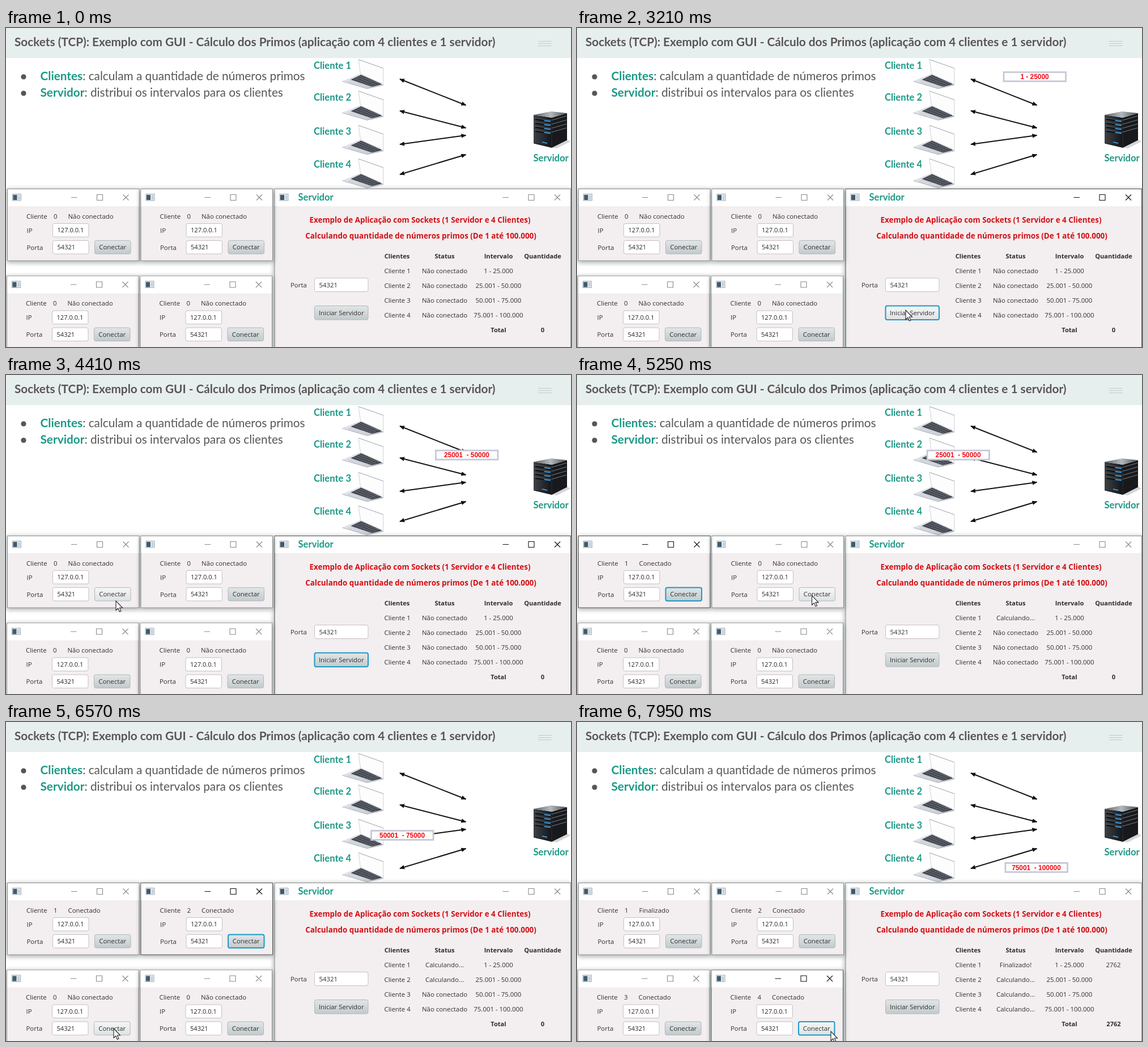
An HTML page for the animation above (8 s loop, 997 px wide and 562 px high).

```html
<!DOCTYPE html>
<html lang="pt">
<head>
<meta charset="utf-8">
<title>Sockets TCP</title>
<style>
html, body { margin: 0; width: 100%; height: 100%; overflow: hidden; background: #fff; }
svg { display: block; width: 100vw; height: 100vh; }
text { white-space: pre; font-variant-ligatures: none; }
.slide { font: 20.77px Lato, sans-serif; fill: #5a5555; }
.bold { font-weight: 700; }
.teal { fill: #1b9986; font-weight: 700; }
.label { font: 700 16.6px Lato, sans-serif; fill: #1b9986; }
.ui { font: 11.4px "Open Sans", sans-serif; fill: #332f30; }
.head { font: 700 11.1px "Open Sans", sans-serif; fill: #302c2d; }
.value { font: 11.1px "Open Sans", sans-serif; fill: #282526; }
.red { font: 700 13.4px "Open Sans", sans-serif; fill: #d40f16; }
.chip { font: 700 11.9px "Liberation Sans", Arial, sans-serif; fill: #f00a12; }
.tag { font: 12.1px "Liberation Sans", Arial, sans-serif; fill: #111; }
.mid { text-anchor: middle; }
</style>
</head>
<body>
<svg id="stage" viewBox="0 0 997 562" preserveAspectRatio="none">
  <defs>
    <marker id="tip" viewBox="0 0 10 10" refX="9" refY="5" markerWidth="9" markerHeight="9" markerUnits="userSpaceOnUse" orient="auto-start-reverse">
      <path d="M0 0.8L10 5L0 9.2Z" fill="#111"/>
    </marker>
    <filter id="shade" x="-10%" y="-15%" width="120%" height="130%">
      <feDropShadow dx="0" dy="2" stdDeviation="4" flood-color="#1c2426" flood-opacity=".45"/>
    </filter>
    <linearGradient id="btn" x2="0" y2="1">
      <stop stop-color="#e1e6e7"/><stop offset="1" stop-color="#c2cacc"/>
    </linearGradient>
    <linearGradient id="btnHover" x2="0" y2="1">
      <stop stop-color="#f6f7f7"/><stop offset="1" stop-color="#dde2e3"/>
    </linearGradient>
    <linearGradient id="deck" x2="1" y2=".4">
      <stop stop-color="#e6e9ee"/><stop offset="1" stop-color="#c6cbd3"/>
    </linearGradient>
    <linearGradient id="metal" x2="1" y2="0">
      <stop stop-color="#3d4146"/><stop offset="1" stop-color="#131518"/>
    </linearGradient>
    <linearGradient id="roof" x2="1" y2="0">
      <stop stop-color="#5c6167"/><stop offset=".5" stop-color="#b4b9bd"/><stop offset="1" stop-color="#4a4f54"/>
    </linearGradient>
  </defs>
  <rect width="997" height="562" fill="#fff"/>
  <g id="slide"></g>
  <g id="tag">
    <rect x="881" y="173" width="60" height="15.5" rx="3" fill="#e8f0ef" stroke="#222"/>
    <text class="tag" x="891.5" y="185">Porta</text>
  </g>
  <g id="tower"></g>
  <g id="windows"></g>
  <g id="chips"></g>
  <g id="cursor"></g>
</svg>
<script>
const LOOP = 8000;
const $ = id => document.getElementById(id);
const clamp = v => Math.max(0, Math.min(1, v));
const ease = u => (1 - Math.cos(Math.PI * clamp(u))) / 2;
const times = (n, f) => Array.from({ length: n }, (_, i) => f(i)).join('');
const text = (cls, x, y, s, id = '') => `<text class="${cls}" x="${x}" y="${y}"${id && ` id="${id}"`}>${s}</text>`;
const poly = (pts, fill, extra = '') => `<polygon points="${pts}" fill="${fill}" ${extra}/>`;
const line = (d, stroke, w = 1) => `<path d="${d}" fill="none" stroke="${stroke}" stroke-width="${w}"/>`;
const box = (x, y, w, h, fill, stroke, id = '', rx = 0) =>
  `<rect x="${x}" y="${y}" width="${w}" height="${h}" rx="${rx}" fill="${fill}" stroke="${stroke}"${id && ` id="${id}"`}/>`;

// Static slide
function laptop(dy) {
  const keys = times(3, i => line(`M${613.5 + 4.8 * i} ${88.6 - 2 * i}l35 13.5`, '#8d929b', .6)) +
    times(9, i => line(`M${612 + 3.8 * i} ${91.8 + 1.5 * i}l19 -8`, '#7d828c', .5));
  return `<g transform="translate(0 ${dy})">` +
    poly('622,55.5 666,71 665.5,100 625.5,81', '#fdfdfe', 'stroke="#c3c7cd" stroke-width=".8"') +
    line('M622 55.5L666 71', '#a4a9b0', .9) +
    poly('593.5,93.5 626,80.5 666,100 637,106.5', 'url(#deck)') +
    poly('608.5,91 626.5,82.5 663.5,99 646,103.5', '#3a3d44') + keys +
    poly('604,94.8 611,93.2 626,98.6 619,100.6', '#d5d9df', 'stroke="#bcc1c9" stroke-width=".5"') +
    line('M593.5 94L637 106.8L666 100.5', '#a9aeb6', 1) + '</g>';
}

function slide() {
  const rows = [0, 55.5, 116, 175];
  const arrows = [[90, 136], [146, 176], [205, 189], [258, 223]];
  return box(0, 0, 997, 53, '#e7efee', 'none') +
    text('slide bold', 15, 32, 'Sockets (TCP): Exemplo com GUI - Cálculo dos Primos (aplicação com 4 clientes e 1 servidor)') +
    times(3, i => line(`M939 ${23.5 + 4 * i}H962.5`, '#c3c9c9')) +
    [['Clientes', ': calculam a quantidade de números primos', 92], ['Servidor', ': distribui os intervalos para os clientes', 121]]
      .map(([a, b, y]) => `<circle cx="31" cy="${y - 6}" r="4.6" fill="#5a5555"/>` +
        text('slide', 60.5, y, `<tspan class="teal">${a}</tspan>${b}`)).join('') +
    rows.map((dy, i) => laptop(dy) + text('label', 543, [72, 128, 188, 246][i], `Cliente ${i + 1}`)).join('') +
    arrows.map(([a, b]) => `<line x1="695" y1="${a}" x2="811.5" y2="${b}" stroke="#111" stroke-width="2" marker-start="url(#tip)" marker-end="url(#tip)"/>`).join('');
}

function tower() {
  const bay = i => {
    const y = 158.5 + 7 * i;
    return line(`M932 ${y}L962.5 ${y + 4}`, '#5f656b', .8) +
      line(`M963 ${y + 4}L989 ${y - 3.5}`, '#868c92', .9) +
      line(`M934 ${y + 2.6}L948 ${y + 4.4}`, '#0c0e10', 2) +
      line(`M950 ${y + 4.6}L961 ${y + 6}`, '#3f9fe6', 1.8);
  };
  return poly('963,211 990,197 996,200 972,212', '#d3d5d7') +
    poly('931,153 963,158 963,210.5 931,203', 'url(#metal)') +
    poly('963,158 990,150 990,197 963,210.5', '#17191c') +
    poly('931,153 962,147 990,150 963,158', 'url(#roof)') +
    times(4, bay) + line('M963 158V210', '#3c4146', .7) +
    line('M946 201l9 2', '#4aa8ea', 1.6) + line('M931.5 203L963 210.5L990 197', '#0a0b0c', 1) +
    text('label', 930.5, 235, 'Servidor');
}

// Windows
const spots = [[0, 0], [235.5, 0], [-1, 153.5], [234.5, 153.5]];

function frame(id, x, w, h, right) {
  return `<g filter="url(#shade)">${box(x, 283.5, w, h, '#f3eeef', '#858585', id + 'edge')}</g>` +
    box(x + .5, 284, w - 1, 30, '#fff', 'none') +
    `<g transform="translate(${x - 2.5})"><rect x="11.5" y="292.5" width="15" height="11.5" fill="#eef1f4" stroke="#a0a9b2"/>` +
    `<rect x="12.5" y="294" width="7" height="9" fill="#3c5b6e"/><rect x="21" y="294.5" width="4" height="8" fill="#c6d0d8"/></g>` +
    `<path id="${id}ctl" transform="translate(${right})" d="M-120.5 298.5h10.5M-75 293.5h10v10h-10zM-29 293.5l10 10m0 -10l-10 10" fill="none" stroke="#888" stroke-width="1.1"/>`;
}

const field = (x, y, w, h, s, cls) => box(x, y, w, h, '#fff', '#c6c0c2', '', 3) + text(cls, x + 8, y + h / 2 + 4, s);
const button = (id, x, y, w, h, s) => box(x, y, w, h, 'url(#btn)', '#b0b7ba', id + 'btn', 3) +
  text('ui mid', x + w / 2, y + h / 2 + 4, s);

function client(i) {
  const id = 'c' + i;
  return `<g transform="translate(${spots[i]})">` + frame(id, 2.5, 232.5, 126.5, 235.5) +
    text('ui', 36, 335.5, 'Cliente') + text('ui', 84, 335.5, '0', id + 'num') + text('ui', 109.5, 335.5, '', id + 'state') +
    text('ui', 36.5, 360.5, 'IP') + field(82.5, 344.5, 63.5, 23.5, '127.0.0.1', 'value') +
    text('ui', 36.5, 390.5, 'Porta') + field(82.5, 374.5, 63.5, 23.5, '54321', 'value') +
    button(id, 156.5, 374.5, 63.5, 23.5, 'Conectar') + '</g>';
}

function server() {
  const ranges = ['1 - 25.000', '25.001 - 50.000', '50.001 - 75.000', '75.001 - 100.000'];
  return frame('s', 474, 522.5, 282, 997) +
    text('label', 515.5, 303.5, 'Servidor') +
    text('red mid', 730.5, 342.5, 'Exemplo de Aplicação com Sockets (1 Servidor e 4 Clientes)') +
    text('red mid', 732, 370.5, 'Calculando quantidade de números primos (De 1 até 100.000)') +
    [['Clientes', 690], ['Status', 774], ['Intervalo', 869], ['Quantidade', 947]].map(([s, x]) => text('head mid', x, 405.5, s)).join('') +
    ranges.map((r, i) => {
      const y = 431.5 + 26 * i;
      return text('ui', 667.5, y, `Cliente ${i + 1}`) + text('ui mid', 774, y, '', 'row' + i) + text('ui mid', 869, y, r);
    }).join('') +
    text('ui mid', 946.5, 431.5, '', 'count') +
    text('head mid', 869, 536, 'Total') + text('head mid', 947, 536, '', 'total') +
    text('ui', 502, 456.5, 'Porta') + field(544.5, 440.5, 94.5, 24, '54321', 'ui') +
    button('s', 544.5, 489.5, 94.5, 24.5, 'Iniciar Servidor');
}

// Packets sent to the clients: label, start time, start y, end y
const packets = [
  ['1 - 25000', 2650, 84, 87],
  ['25001  - 50000', 3878, 141, 141],
  ['50001  - 75000', 5451, 198, 199.6],
  ['75001  - 100000', 7405, 255.5, 257]
];
const packet = ([s], i) => `<g id="p${i}"><rect x="-54.5" y="-8" width="109.5" height="16" fill="#fff" stroke="#c6c8d6" stroke-width="2.8"/>` +
  text('chip mid', 0, 4.3, s) + '</g>';

$('slide').innerHTML = slide();
$('tower').innerHTML = tower();
$('windows').innerHTML = server() + times(4, client);
$('chips').innerHTML = packets.map(packet).join('');

// Pointer
const route = [
  [2100, 144, 562], [2760, 580, 497], [3720, 580, 497], [4350, 194, 398], [4800, 194, 398],
  [5340, 430, 388], [5640, 430, 388], [6030, 327, 425], [6480, 190, 540], [6720, 190, 540],
  [7110, 367, 542], [7290, 412, 541], [7830, 412, 544], [7950, 448, 545]
];
const shapes = {
  arrow: '<path d="M0 0V16.5L3.8 13L6.4 19L9 17.9L6.4 12H11.5Z" fill="#fff" stroke="#222" stroke-width="1.1"/>',
  beam: '<path d="M-4 -8H-1.5L0 -7L1.5 -8H4M0 -7V7M-4 8H-1.5L0 7L1.5 8H4" fill="none" stroke="#222" stroke-width="1.4"/>',
  resize: '<path d="M0 -12L5 -6H1.6V6H5L0 12L-5 6H-1.6V-6H-5Z" fill="#fff" stroke="#222" stroke-width="1.1"/>'
};

function pointer(t) {
  if (t < route[0][0]) return null;
  const k = route.findIndex(p => p[0] > t);
  if (k < 0) return route[route.length - 1].slice(1);
  const [t0, x0, y0] = route[k - 1], [t1, x1, y1] = route[k];
  const u = ease((t - t0) / (t1 - t0));
  return [x0 + (x1 - x0) * u, y0 + (y1 - y0) * u];
}

const within = (p, x, y, w, h) => !!p && p[0] >= x && p[0] <= x + w && p[1] >= y && p[1] <= y + h;
const overField = p => within(p, 544, 440, 95, 25) ||
  spots.some(([x, y]) => within(p, x + 82, y + 344, 64, 24) || within(p, x + 82, y + 374, 64, 24));
const kind = p => within(p, 0, 411, 470, 25) ? 'resize' : overField(p) ? 'beam' : 'arrow';

const clicks = [4590, 5490, 6600, 7410];
const startClick = 2940, reply = 120, finish = 7560;

function put(id, s) {
  const el = $(id);
  if (el.textContent !== s) el.textContent = s;
}

function setActive(id, on, hover) {
  $(id + 'ctl').setAttribute('stroke', on ? '#111' : '#8a8a8a');
  $(id + 'edge').setAttribute('stroke', on ? '#505050' : '#8c8c8c');
  const b = $(id + 'btn');
  b.setAttribute('fill', hover ? 'url(#btnHover)' : 'url(#btn)');
  b.setAttribute('stroke', on ? '#1c9ac6' : '#b0b7ba');
  b.setAttribute('stroke-width', on ? 2 : 1);
}

function draw(t) {
  $('tag').setAttribute('opacity', Math.min(clamp((t - 1000) / 480), clamp((2510 - t) / 500)));

  const p = pointer(t);
  const done = t >= finish;
  const last = clicks.filter(c => t >= c).length - 1;
  setActive('s', t >= startClick && last < 0, within(p, 544, 489, 95, 25));
  clicks.forEach((c, i) => {
    const [x, y] = spots[i], on = t >= c + reply, over = done && i === 0;
    setActive('c' + i, i === last, within(p, x + 156, y + 374, 64, 25));
    put(`c${i}num`, on ? String(i + 1) : '0');
    put(`c${i}state`, over ? 'Finalizado' : on ? 'Conectado' : 'Não conectado');
    put('row' + i, over ? 'Finalizado!' : on ? 'Calculando...' : 'Não conectado');
  });
  put('count', done ? '2762' : '');
  put('total', done ? '2762' : '0');

  packets.forEach(([, start, y0, y1], i) => {
    const age = t - start, u = ease(age / 1500), g = $('p' + i);
    g.setAttribute('visibility', age >= 0 && age < 1740 ? 'visible' : 'hidden');
    g.setAttribute('transform', `translate(${869 - 200 * u} ${y0 + (y1 - y0) * Math.min(1, 2 * u)})`);
  });

  const cur = $('cursor');
  cur.innerHTML = p ? shapes[kind(p)] : '';
  if (p) cur.setAttribute('transform', `translate(${p})`);
}

const begin = performance.now();
function tick() {
  draw((performance.now() - begin) % LOOP);
  requestAnimationFrame(tick);
}
tick();
</script>
</body>
</html>
```
